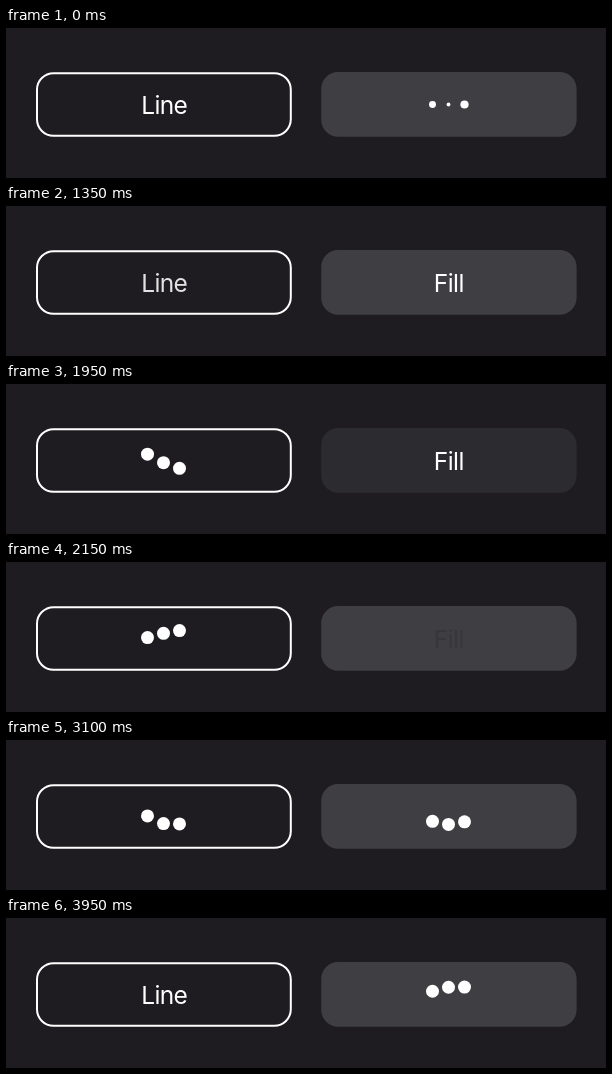
An HTML page with a canvas for the animation above (4000 ms loop, 600 px wide and 150 px high).

```html
<!DOCTYPE html>
<html lang="en">
<head>
<meta charset="utf-8">
<title>Loading buttons</title>
<style>
  html, body { margin: 0; width: 100%; height: 100%; overflow: hidden; background: #1e1c20; }
  canvas { display: block; }
</style>
</head>
<body>
<canvas id="stage" width="600" height="150"></canvas>
<script>
const ctx = document.getElementById('stage').getContext('2d');
const LOOP = 4000, MID = 76.5, RADIUS = 6.5, GAP = 16;
const PRESS = 40, FADE = 195, LOAD = 2045;

const clamp = x => Math.min(1, Math.max(0, x));

// CSS-style cubic bezier, solved by bisection
function bezier(x1, y1, x2, y2) {
  const at = (a, b, s) => 3 * (1 - s) * (1 - s) * s * a + 3 * (1 - s) * s * s * b + s * s * s;
  return x => {
    let lo = 0, hi = 1;
    for (let i = 0; i < 24; i++) {
      const s = (lo + hi) / 2;
      if (at(x1, x2, s) < x) lo = s; else hi = s;
    }
    return at(y1, y2, lo);
  };
}
const easeInOut = bezier(.42, 0, .58, 1);
const snap = bezier(.2, .68, .18, 1.08);

function keyframes(u, times, values, ease) {
  let i = 0;
  while (i < times.length - 2 && u >= times[i + 1]) i++;
  const p = ease(clamp((u - times[i]) / (times[i + 1] - times[i])));
  return values[i] + (values[i + 1] - values[i]) * p;
}

function dot(x, y, r) {
  ctx.fillStyle = '#fff';
  ctx.beginPath();
  ctx.arc(x, y, r, 0, 2 * Math.PI);
  ctx.fill();
}

// Dots bobbing one after another, `age` ms after they appear
function wave(x, age) {
  for (let i = 0; i < 3; i++) {
    const a = age - (i + 1) * 70;
    const dy = a < 0 ? 0 : keyframes(a % 600 / 600, [0, .33, .66, 1], [0, 8, -8, 0], easeInOut);
    dot(x + i * GAP, MID + dy, RADIUS);
  }
}

// Dots shrinking and growing one after another
function pulse(x, age) {
  for (let i = 0; i < 3; i++) {
    const u = (age - (i + 1) * 120) % 750 / 750;
    dot(x + i * GAP, MID, RADIUS * keyframes(u, [0, .3, 1], [1, .3, 1], snap));
  }
}

function label(text, x, shade, alpha) {
  ctx.fillStyle = `rgba(${shade},${shade},${shade},${clamp(alpha)})`;
  ctx.fillText(text, x, 86);
}
const fadeIn = (text, x, age) => label(text, x, 255, age / FADE);
// The label darkens while it fades
function fadeOut(text, x, age) {
  const p = clamp(age / FADE);
  label(text, x, 255 * (1 - p), 1 - .85 * p);
}

function box(x, y, w, h, r) {
  ctx.beginPath();
  ctx.roundRect(x, y, w, h, r);
}

function lineButton(t) {
  const press = 1298, loading = 1530, done = loading + LOAD;
  box(31, 45.2, 253.8, 62.6, 16.5);
  if (t >= press && t < press + PRESS) {
    ctx.fillStyle = '#aaa';
    ctx.fill();
  }
  ctx.strokeStyle = '#fff';
  ctx.lineWidth = 2;
  ctx.stroke();
  if (t < loading) fadeOut('Line', 158.2, t - press - PRESS);
  else if (t < done) wave(141.5, t - loading);
  else fadeIn('Line', 158.2, t - done);
}

function fillButton(t) {
  const done = 153, press = 1940, loading = 2172;
  const pressed = t >= press && t < press + PRESS;
  box(315.2, 44, 255.4, 64.7, 17);
  ctx.fillStyle = pressed ? '#2c2b2f' : '#3f3e43';
  ctx.fill();
  if (t < done) pulse(426.5, t - done + LOAD);
  else if (t < press) fadeIn('Fill', 442.8, t - done);
  else if (t < loading) fadeOut('Fill', 442.8, t - press - PRESS);
  else wave(426.5, t - loading);
}

function draw(t) {
  ctx.fillStyle = '#1e1c20';
  ctx.fillRect(0, 0, 600, 150);
  ctx.font = '400 24.5px Inter, Roboto, sans-serif';
  ctx.letterSpacing = '-0.6px';
  ctx.textAlign = 'center';
  lineButton(t);
  fillButton(t);
}

const begin = performance.now();
function tick() {
  draw((performance.now() - begin) % LOOP);
  requestAnimationFrame(tick);
}
tick();
</script>
</body>
</html>
```
